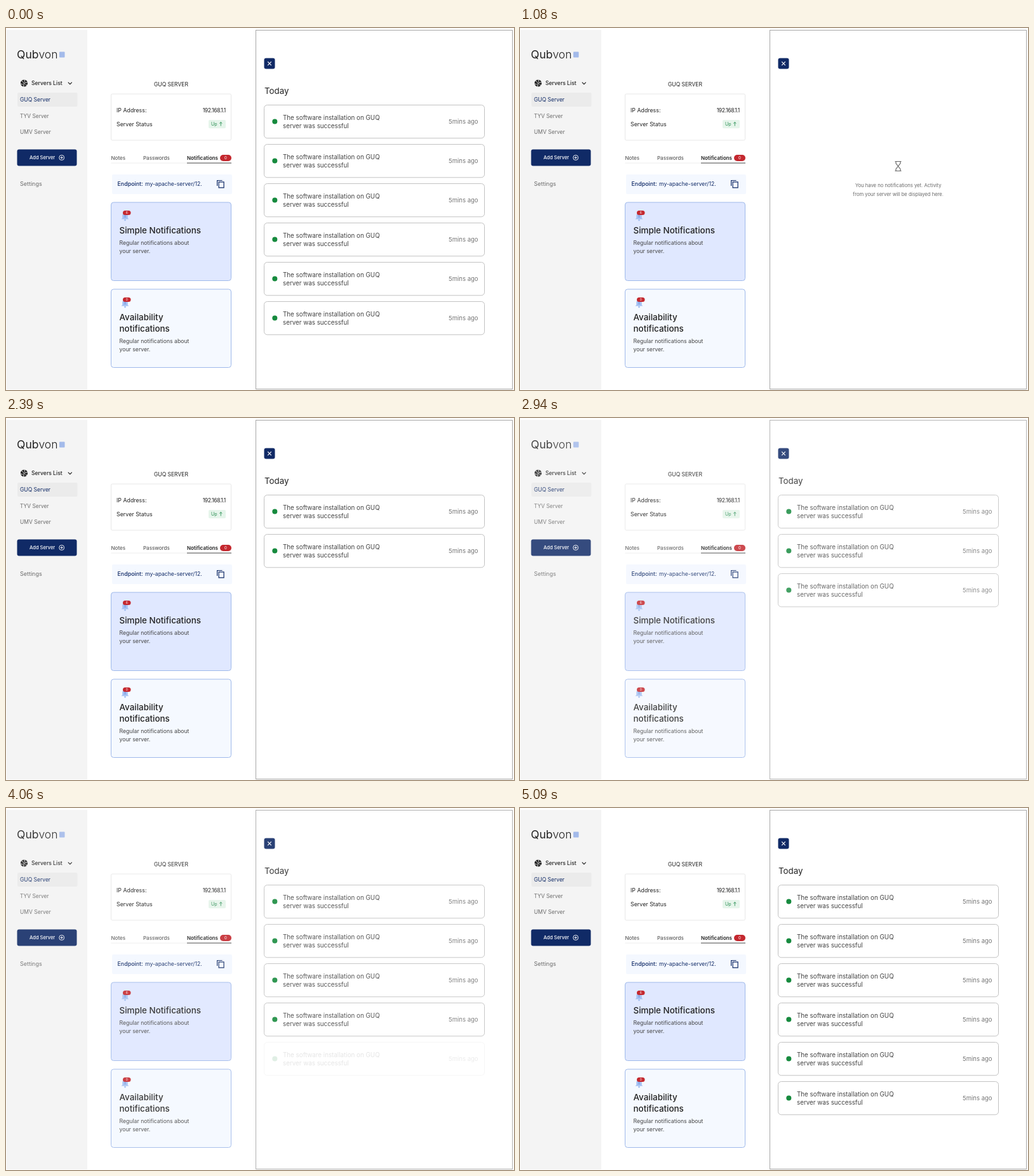
Recreate the animation shown at these times as an HTML page. Size 800 px wide and 571 px high, loop 5250 ms.

```html
<!DOCTYPE html>
<html lang="en">
<head>
<meta charset="utf-8">
<title>Server notifications</title>
<style>
  html, body { margin: 0; width: 100%; height: 100%; overflow: hidden; background: #fff; }
  svg { display: block; width: 100%; height: 100%; font-family: Inter, "Open Sans", sans-serif; }
</style>
</head>
<body>
<svg id="stage" viewBox="0 0 800 571" xmlns="http://www.w3.org/2000/svg"></svg>
<script>
const NAVY = '#102a66', RED = '#c4282f', INK = '#222', GREY = '#5c5c5c';
const LOOP = 5250, CUT = 80, RATE = 0.22, TICK = 10;

// Each dissolve: first step, last step, number of steps, opacity at the first step
const FADES = [
  [660, 880, 4, .2],
  [1300, 1680, 6, .02],
  [2010, 2390, 6, .02],
  [2710, 3010, 5, .14],
  [3340, 3810, 7, .02],
  [4060, 4370, 5, .13],
  [4790, 5090, 5, .08]
];

const text = (x, y, size, str, fill = INK, extra = '') =>
  `<text x="${x}" y="${y}" font-size="${size}" fill="${fill}" ${extra}>${str}</text>`;
const rect = (x, y, w, h, fill, r = 0, stroke = 'none') =>
  `<rect x="${x}" y="${y}" width="${w}" height="${h}" rx="${r}" fill="${fill}" stroke="${stroke}"/>`;
const line = (d, stroke, width = 1) =>
  `<path d="${d}" fill="none" stroke="${stroke}" stroke-width="${width}"/>`;
const MEDIUM = 'font-weight="500"', BOLD = 'font-weight="600"';
const END = 'text-anchor="end"', MID = 'text-anchor="middle"';

const pill = (x, y, w, h, label, size) =>
  rect(x, y, w, h, RED, h / 2) + text(x + w / 2, y + h / 2 + size * .36, size, label, '#fff', MID);

const upArrow = (x, y, color) =>
  line(`M${x} ${y + 6}v-6m-2.2 2.2l2.2-2.2l2.2 2.2`, color, .9);

const copyIcon = (x, y, color) =>
  line(`M${x} ${y + 9}v-8.5h8M${x + 2.5} ${y + 2.8}h8v9h-8z`, color, 1.2);

const bell = (x, y) => `<g transform="translate(${x} ${y})" fill="#a3bff2">
  <path d="M0 10.5L1.8 8.7V4.8Q1.8 1.4 6 .7Q10.2 1.4 10.2 4.8V8.7L12 10.5z"/>
  <circle cx="6" cy="12" r="1.4"/>
  <path d="M6 4v4" stroke="#6f94dc"/></g>`;

function sidebar() {
  return rect(1, 3, 127, 567, '#f4f4f4') +
    text(17, 48, 17.5, 'Qub<tspan font-weight="300">von</tspan>') +
    rect(84, 37.5, 8.5, 9, '#a3baea', 1) +
    `<circle cx="28.5" cy="87" r="5.6" fill="${INK}"/>` +
    line('M28.5 87L24 82.5M28.5 87l6-1.8M28.5 87l-1 6M23 88l3.5 1M29 81l.5 4M33.5 91l-3-2', '#f4f4f4', .9) +
    text(40, 90, 8.6, 'Servers List', INK, MEDIUM) +
    line('M97.8 85.7l3 3l3-3', INK, 1.2) +
    rect(18, 102, 94.5, 22, '#ebebeb', 2) +
    text(22, 116.3, 8.5, 'GUQ Server', NAVY) +
    text(22, 142, 8.4, 'TYV Server', '#6c6c6c') +
    text(22, 167.3, 8.5, 'UMV Server', '#6c6c6c') +
    rect(17.5, 191.5, 94, 26, NAVY, 3) +
    text(37, 207.3, 7.5, 'Add Server', '#fff', MEDIUM) +
    `<circle cx="87.7" cy="204.5" r="4" fill="none" stroke="#fff" stroke-width=".9"/>` +
    line('M85.4 204.5h4.6M87.7 202.2v4.6', '#fff', .9) +
    text(22, 249.3, 9, 'Settings', '#6c6c6c');
}

function tabs(x, y) {
  return text(x, y, 8, 'Notes', GREY, MEDIUM) +
    text(x + 50.5, y, 8, 'Passwords', GREY, MEDIUM) +
    text(x + 119.5, y, 7.9, 'Notifications', INK, BOLD) +
    pill(x + 171.5, y - 8, 18, 10, '0', 6) +
    line(`M${x} ${y + 5}h120`, '#ececec') +
    line(`M${x + 119.5} ${y + 5}h70`, '#444', 1.2);
}

// Titles and body share the left margin of a notification type card
function card(x, y, w, fill, titles) {
  const left = x + 13, body = y + 49 + titles.length * 18;
  return rect(x, y, w, 123.5, fill, 4, '#9fb9ea') +
    titles.map((s, i) => text(left, y + 49 + i * 18, 13.4, s, INK, MEDIUM)).join('') +
    text(left, body, 8.7, 'Regular notifications about', '#444') +
    text(left, body + 13.3, 8.7, 'your server.', '#444');
}

const SIMPLE = ['Simple Notifications'], AVAILABILITY = ['Availability', 'notifications'];

function wideScene() {
  return sidebar() +
    text(168, 96.8, 8.5, 'GUQ SERVER', INK) +
    rect(168, 108, 543, 74, 'none', 4, '#b0b0b0') +
    text(181, 129.7, 9.6, 'IP Address:') +
    text(698, 127.8, 9.6, '192.168.0.1', INK, END + ' letter-spacing="-.35"') +
    text(181, 167.7, 9.8, 'Server Status:') +
    rect(655, 155, 43, 18, '#bce2cb', 2) +
    text(667, 166.7, 6.6, 'UP', '#1f7a45') + upArrow(683, 161, '#1f7a45') +
    tabs(168, 209) +
    rect(168, 258, 330.5, 46, '#f6f9ff', 3) +
    text(183, 276, 10, 'Endpoint:', '#20294a') +
    text(235, 275, 6.2, 'my-apache-server/12.13.12.14', '#20294a') +
    `<path d="M427 281q6-8 12 0q-6 8-12 0z" fill="#333"/>
     <circle cx="433" cy="281" r="2.3" fill="#333" stroke="#fff" stroke-width="1"/>` +
    rect(457.5, 265.5, 24.5, 31, '#fff', 3, '#b4c6ec') +
    text(469.7, 275, 6.6, 'Copy', '#4a74c9', MID) +
    copyIcon(464.5, 281.5, '#4a74c9') +
    card(168.5, 326, 155, '#f3f8ff', SIMPLE) + bell(184, 341) + pill(190, 339, 18, 10, '6', 5.5) +
    card(342, 326, 155, '#f5f9ff', AVAILABILITY) + bell(357.5, 341) + pill(363, 339, 18, 10, '0', 5.5);
}

function emptyState() {
  return line('M590.5 210.5h10M590.5 225.5h10M592 210.5v3l3.5 4.5l-3.5 4.5v3M599 210.5v3l-3.5 4.5l3.5 4.5v3', '#6a6a6a', 1.2) +
    text(595.7, 251.3, 7.65, 'You have no notifications yet. Activity', '#6a6a6a', MID) +
    text(595.7, 264.5, 7.65, 'from your server will be displayed here.', '#6a6a6a', MID);
}

function notice(i) {
  const y = 121.5 + i * 62;
  return rect(406.5, y, 347, 52.3, '#fff', 5, '#c2c2c2') +
    `<circle cx="423.3" cy="${y + 26}" r="4" fill="#168a3e"/>` +
    text(436, y + 23.2, 9.8, 'The software installation on GUQ', '#444') +
    text(436, y + 36.6, 9.8, 'server was successful', '#444') +
    text(743.5, y + 29.8, 9.5, '5mins ago', '#757575', END);
}

// The list lies on its own white sheet, which hides the empty state below it
function noticeList(count) {
  let list = rect(394, 4, 403, 565, '#fff') + text(407, 103.8, 13.3, 'Today');
  for (let i = 0; i < count; i++) list += notice(i);
  return list;
}

function panelScene(count) {
  return sidebar() +
    text(233, 91.8, 8.5, 'GUQ SERVER') +
    rect(165.5, 104, 189, 73, 'none', 2, '#e8e8e8') +
    text(174, 132.7, 8.8, 'IP Address:') +
    text(346, 132.7, 8.6, '192.168.1.1', INK, END + ' letter-spacing="-.35"') +
    text(174, 154.5, 8.9, 'Server Status') +
    rect(319, 145, 27, 13.3, '#e6f5eb', 2) +
    text(323, 154.3, 7.2, 'Up', '#2f9257') + upArrow(338.3, 148.5, '#2f9257') +
    tabs(165.5, 208) +
    rect(167, 231, 189, 31, '#f4f8ff', 2) +
    text(175.5, 249.3, 8.9, 'Endpoint:', NAVY, MEDIUM) +
    text(219, 249.3, 8.6, 'my-apache-server/12.', NAVY) +
    copyIcon(332.6, 240, NAVY) +
    card(165.5, 275, 189, '#e0e8ff', SIMPLE) + bell(181.5, 291) + pill(184, 288, 12.5, 7, '6', 5) +
    card(165.5, 412, 189, '#f5f9ff', AVAILABILITY) + bell(181.5, 428) + pill(184, 425, 12.5, 7, '0', 5) +
    (count ? noticeList(count) : emptyState()) +
    rect(393.5, 3.5, 404, 566, 'none', 0, '#a8a8a8') +
    rect(406.5, 47.5, 17, 17, NAVY, 3) +
    line('M412.2 53.2l5.6 5.6m0-5.6l-5.6 5.6', '#fff', 1.2);
}

const stage = document.getElementById('stage');
const scenes = [wideScene(), ...Array.from({ length: 7 }, (_, n) => panelScene(n))];
stage.innerHTML = scenes.map(s => `<g>${s}</g>`).join('');
const layers = [...stage.children];

function stateAt(t) {
  if (t < CUT) return [FADES.length, 1];
  const k = FADES.filter(f => f[0] <= t).length;
  if (!k) return [0, 1];
  const [start, end, steps, first] = FADES[k - 1];
  const step = Math.floor((t - start + TICK) / ((end - start) / (steps - 1)));
  return [k, t >= end ? 1 : Math.min(1, first + step * RATE)];
}

function draw(now) {
  const [k, p] = stateAt(now % LOOP);
  layers.forEach((layer, i) => {
    const alpha = i === k ? p : i === k - 1 ? 1 - p : 0;
    layer.style.display = alpha ? '' : 'none';
    layer.style.opacity = alpha;
  });
}

const began = performance.now();
function tick() {
  draw(performance.now() - began);
  requestAnimationFrame(tick);
}
tick();
</script>
</body>
</html>
```
